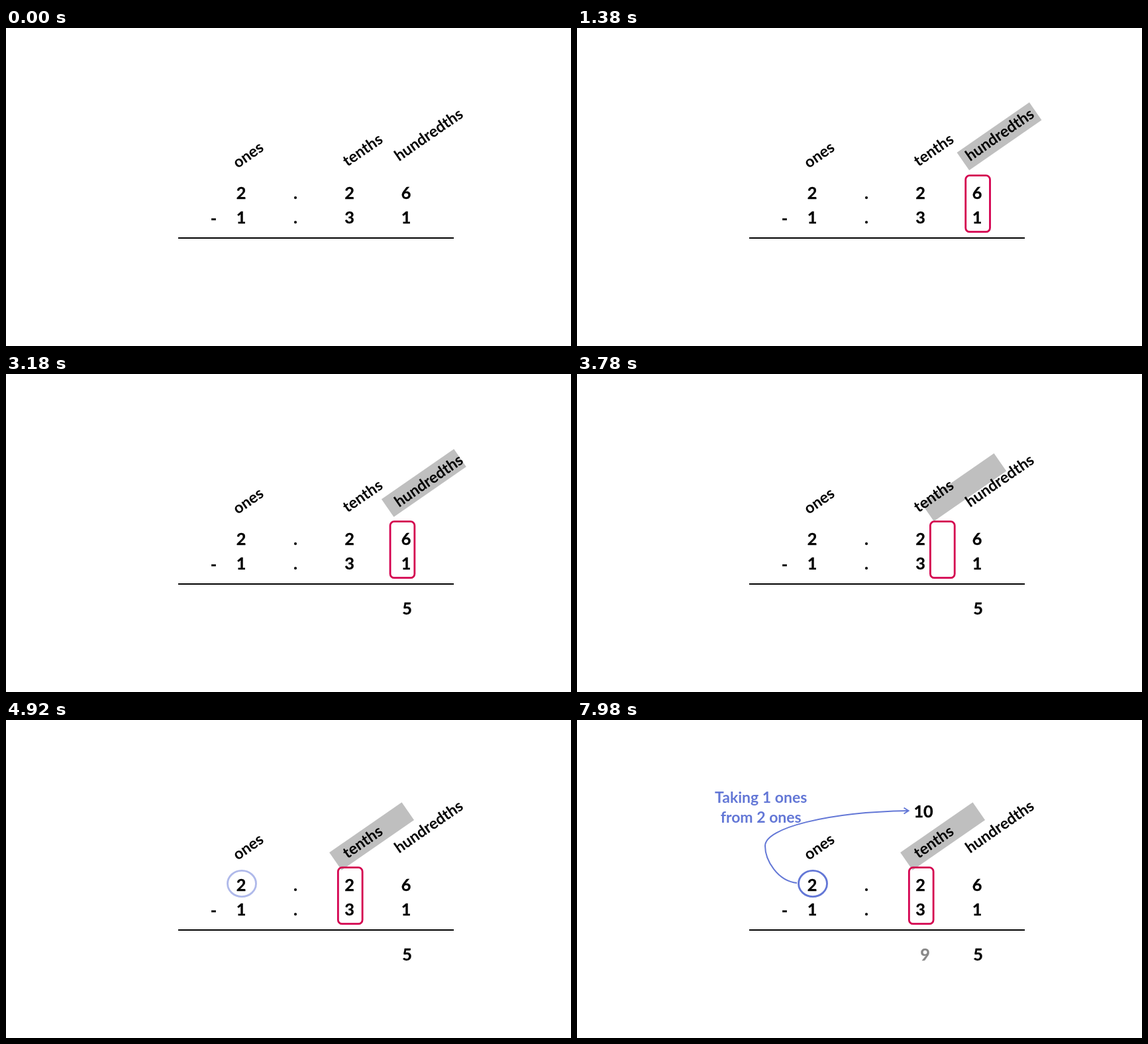
An HTML page that plays this animation: 853x480 px, repeating every 8 s.

```html
<!DOCTYPE html>
<html lang="en">
<head>
<meta charset="utf-8">
<title>Decimal subtraction</title>
<style>
  html, body { margin: 0; width: 100%; height: 100%; overflow: hidden; background: #fff; }
  svg { display: block; width: 100vw; height: 100vh; }
  text { font: 700 23px Lato, Carlito, sans-serif; text-anchor: middle; }
  #labels text { font-size: 23.5px; }
  .digits text, text.digits { font-size: 25.2px; stroke: #000; stroke-width: .35; }
  .blue { fill: none; stroke: #6377d6; }
  .note { fill: #6377d6; }
</style>
</head>
<body>
<svg viewBox="0 0 853 480">
  <defs>
    <clipPath id="wipe"><rect id="wipeArea" x="280" y="120" height="140"/></clipPath>
  </defs>

  <g id="marker">
    <rect x="-66.5" y="-16.3" width="133" height="32.6" fill="#bfbfbf" transform="translate(637.5 163.5) rotate(-34.7)"/>
  </g>

  <g id="labels">
    <text transform="translate(370.2 198) rotate(-34.7)">ones</text>
    <text transform="translate(543 190.7) rotate(-34.7)">tenths</text>
    <text transform="translate(642.6 167.6) rotate(-34.7)">hundredths</text>
  </g>

  <g class="digits">
    <text x="355" y="258">2</text><text x="437" y="258">.</text>
    <text x="518.5" y="258">2</text><text x="604" y="258">6</text>
    <text x="313.5" y="296">-</text>
    <text x="355" y="295">1</text><text x="437" y="295">.</text>
    <text x="518.5" y="295">3</text><text x="604" y="295">1</text>
    <text id="hundredthsResult" x="605.5" y="363">5</text>
    <text id="tenthsResult" x="525.5" y="363">9</text>
  </g>
  <path d="M260 317H676" stroke="#000" stroke-width="2"/>

  <rect id="frame" x="586.7" y="222.7" width="36.8" height="85" rx="6" fill="none" stroke="#d4004f" stroke-width="2.8"/>
  <ellipse id="circle" class="blue" cx="356" cy="247" rx="21.5" ry="19.6" stroke-width="2.8"/>

  <g class="blue" stroke-width="2" clip-path="url(#wipe)">
    <path d="M332 246C303 243 284 212 284 190C284 163 378 139 500 137"/>
    <path d="M493.5 132.5L500.5 137L493.5 141.5"/>
  </g>

  <g id="borrow">
    <text class="note" x="277.7" y="125">Taking 1 ones</text>
    <text class="note" x="277.7" y="155">from 2 ones</text>
    <text class="digits" x="523" y="147">10</text>
  </g>
</svg>
<script>
  const LOOP = 8000, STEP = 60;
  const el = id => document.getElementById(id);
  const progress = (t, start, end) => Math.min(1, Math.max(0, (t - start) / (end - start)));
  const ease = p => (1 - Math.cos(Math.PI * p)) / 2;

  // Fade-in intervals in milliseconds
  const fades = {
    marker: [30, 1360],
    frame: [30, 1360],
    hundredthsResult: [1450, 2850],
    circle: [4330, 5480],
    borrow: [5970, 7240],
    tenthsResult: [7400, 8640]
  };

  function draw(t) {
    for (const id in fades) el(id).setAttribute('opacity', progress(t, ...fades[id]));
    const shift = ease(progress(t, 2910, 4410));
    el('marker').setAttribute('transform', `translate(${-85.4 * shift} ${12 * shift})`);
    el('frame').setAttribute('transform', `translate(${-85.4 * shift} 0)`);
    el('wipeArea').setAttribute('width', 225 * progress(t, 5450, 5950));
  }

  const origin = performance.now();
  function tick() {
    const t = (performance.now() - origin) % LOOP;
    draw(Math.floor(t / STEP) * STEP);
    requestAnimationFrame(tick);
  }
  draw(0);
  requestAnimationFrame(tick);
</script>
</body>
</html>
```
